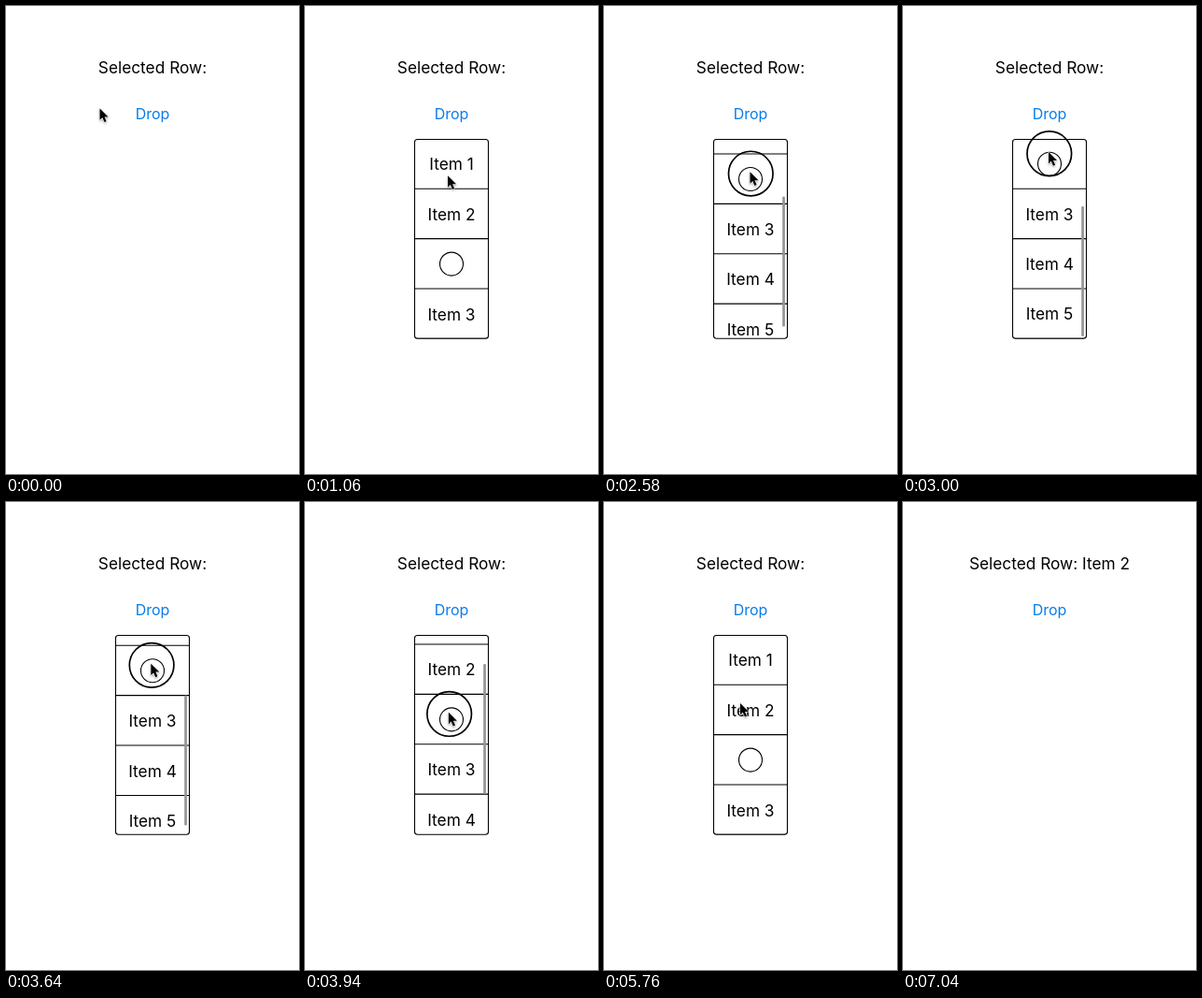
Write an HTML page that moves like this. It is 314 px wide and 500 px high and loops after 8.34 s.

```html
<!DOCTYPE html>
<html lang="en">
<head>
<meta charset="utf-8">
<title>Drop-down</title>
<style>
  html, body { margin: 0; width: 100%; height: 100%; overflow: hidden; background: #fff; }
  svg { display: block; width: 314px; height: 500px; }
  text { font: 17.3px Inter, "Open Sans", sans-serif; text-anchor: middle; fill: #000; }
  .button { font-size: 16px; fill: #087bea; }
  .line { fill: none; stroke: #000; stroke-width: 1.1; }
  #bar { fill: #949494; }
  #ring { fill: none; stroke: #000; stroke-width: 1.7; }
  #pointer path { stroke: #fff; stroke-width: 1.2; stroke-linejoin: round; paint-order: stroke; }
  #pointer { filter: drop-shadow(0 1px 1px rgba(0, 0, 0, .35)); }
</style>
</head>
<body>
<svg viewBox="0 0 314 500">
  <defs>
    <clipPath id="frame"><rect x="117.5" y="142.5" width="79" height="212.7" rx="3"/></clipPath>
  </defs>
  <text id="label" x="157" y="72"></text>
  <text class="button" x="157" y="121.2">Drop</text>
  <g id="menu">
    <rect x="117.5" y="142.5" width="79" height="212.7" rx="3" fill="#fff"/>
    <g clip-path="url(#frame)">
      <g id="rows"></g>
      <rect id="bar" x="191.2" width="2.7" height="139" rx="1.35"/>
    </g>
    <rect class="line" x="117.5" y="142.5" width="79" height="212.7" rx="3"/>
  </g>
  <circle id="ring" r="23.8"/>
  <g id="pointer"><path transform="scale(.87)" d="M0 0V14.2L3.2 11.2L5.7 16.8L8.2 15.7L5.8 10.3H10.4Z"/></g>
</svg>
<script>
const LOOP = 8340;
const ROW = 53.4;
const TOP = 142.3;
const MAX_SCROLL = 2 * ROW;
const DRAG_ORIGIN = 268;

const easeIn = power => u => u ** power;
const easeOut = power => u => 1 - (1 - u) ** power;
const smooth = u => u * u * (3 - 2 * u);
const linear = u => u;

// Each move starts where the one before it ended
const home = { x: 100.5, y: 109.5 };
const moves = [
  { start: 20, end: 400, x: 146, y: 113, ease: smooth },             // to the button
  { start: 840, end: 1680, x: 163, y: 278, ease: easeOut(1.75) },    // into the list
  { start: 1800, end: 2620, x: 156, y: 170, ease: easeIn(1.45) },    // drag up
  { start: 2620, end: 3220, x: 156, y: 148, ease: linear },
  { start: 3480, end: 4300, x: 152, y: 291, ease: easeIn(1.08) },    // drag down
  { start: 4300, end: 4440, x: 146, y: 318.5, ease: linear },
  { start: 4700, end: 5140, x: 147, y: 205, ease: smooth },          // to the second item
  { start: 5540, end: 5760, x: 146, y: 215, ease: smooth },
  { start: 6820, end: 7040, x: 325, y: 217, ease: easeIn(2) }        // off stage
];
const drag = { down: 1800, up: 4620 };
const presses = [{ down: 580, up: 700 }, drag, { down: 6340, up: 6460 }];

const byId = id => document.getElementById(id);
const [label, menu, rows, bar, ring, pointer] =
  ["label", "menu", "rows", "bar", "ring", "pointer"].map(byId);

rows.innerHTML = ["Item 1", "Item 2", "", "Item 3", "Item 4", "Item 5"].map((name, i) => {
  const y = TOP + i * ROW;
  const content = name
    ? `<text x="157" y="${y + 33}">${name}</text>`
    : `<circle class="line" cx="157" cy="${y + 26.5}" r="12.5"/>`;
  return `${content}<path class="line" d="M117 ${y + ROW - .5}h80"/>`;
}).join("");

const clamp = (v, lo, hi) => Math.min(hi, Math.max(lo, v));
const ramp = (t, from, to) => clamp((t - from) / (to - from), 0, 1);
const isHeld = (press, t) => t >= press.down && t < press.up;

function pointerAt(t) {
  return moves.reduce((from, { start, end, x, y, ease }) => {
    const k = ease(ramp(t, start, end));
    return { x: from.x + (x - from.x) * k, y: from.y + (y - from.y) * k };
  }, home);
}

function render(t) {
  const { x, y } = pointerAt(t);
  pointer.setAttribute("transform", `translate(${x} ${y})`);

  ring.style.display = presses.some(press => isHeld(press, t)) ? "" : "none";
  ring.setAttribute("cx", x + .8);
  ring.setAttribute("cy", y + 1.7);

  const scroll = isHeld(drag, t) ? clamp(DRAG_ORIGIN - y, 0, MAX_SCROLL) : 0;
  rows.setAttribute("transform", `translate(0 ${-scroll})`);
  bar.setAttribute("y", 145 + 69 * scroll / MAX_SCROLL);
  bar.style.opacity = ramp(t, 1940, 2040) * (1 - ramp(t, 4700, 4960));

  menu.style.opacity = ramp(t, 700, 840) * (1 - ramp(t, 6450, 6580));
  label.textContent = t < 6460 ? "Selected Row:" : "Selected Row: Item 2";
}

const began = performance.now();
function tick() {
  render((performance.now() - began) % LOOP);
  requestAnimationFrame(tick);
}
tick();
</script>
</body>
</html>
```
